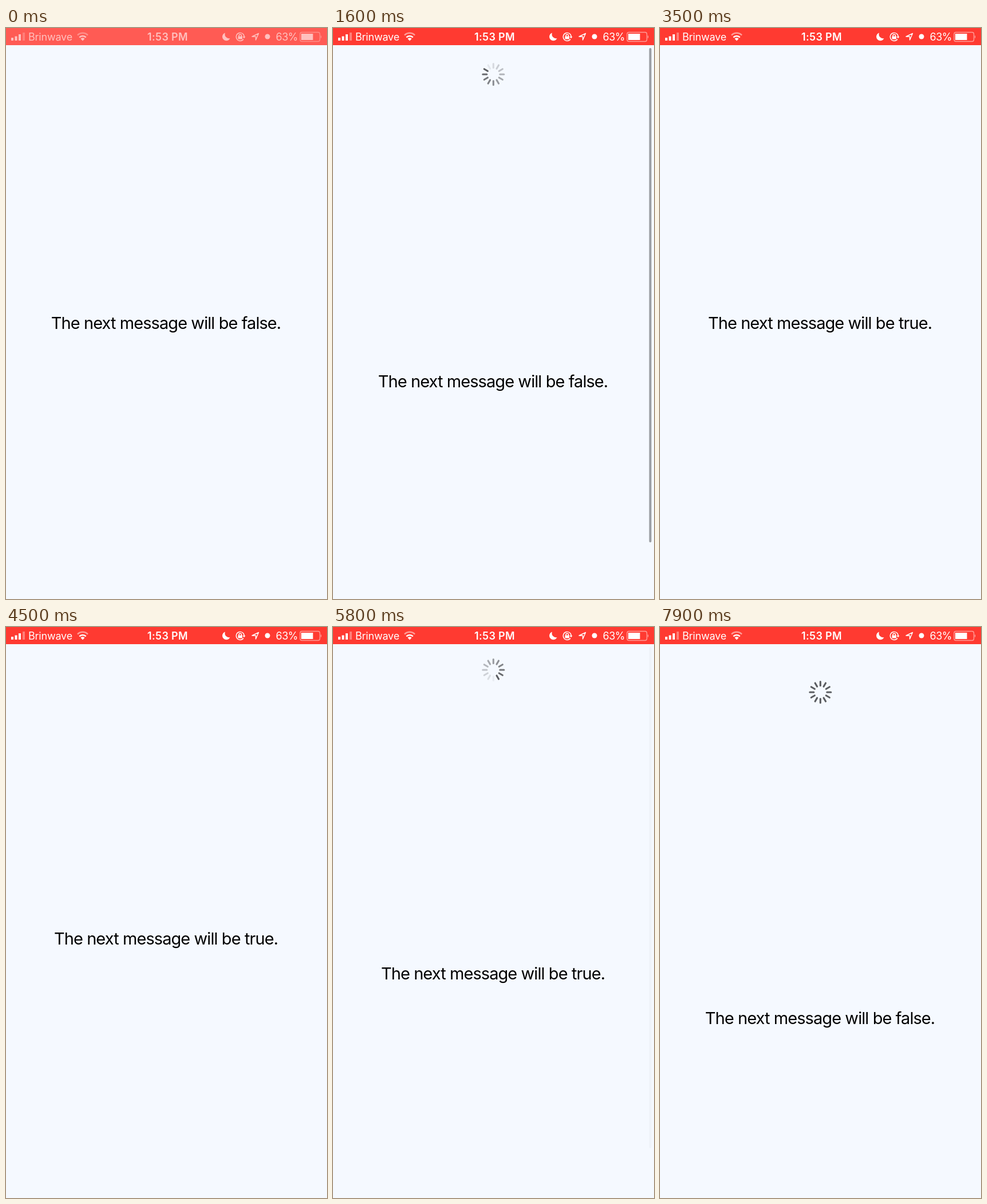
Write an HTML page that moves like this. It is 561 by 998 pixels and loops after 8000 ms.

```html
<!DOCTYPE html>
<html lang="en">
<head>
<meta charset="utf-8">
<title>Pull to refresh</title>
<style>
  html, body { margin: 0; width: 100%; height: 100%; overflow: hidden; background: #f5f9ff; }
  svg { display: block; font-family: Inter, Roboto, sans-serif; }
  #message { font-size: 29px; letter-spacing: -.93px; text-anchor: middle; }
  #status { fill: #fff; font-size: 18px; }
  .stroke { fill: none; stroke: #fff; stroke-width: 1.4; }
  #spinner line { stroke: #5b5d61; stroke-width: 3.1; stroke-linecap: round; }
</style>
</head>
<body>
<svg width="561" height="998" viewBox="0 0 561 998">
  <text id="message" x="279.500" y="526"></text>
  <g id="spinner"></g>
  <rect id="scrollbar" x="552.5" y="35" width="4" rx="2" fill="#9a9da2"/>
  <rect id="bar" width="561" height="30"/>
  <g id="status">
    <path d="M9 17h4v5h-4zM15.500 14.500h4v7.500h-4zM22 11h4v11h-4z"/>
    <path d="M29 8h4v14h-4z" opacity=".35"/>
    <text x="39" y="22" letter-spacing="-.2">Brinwave</text>
    <path d="M134 22.500l-3.500-3.700a5 5 0 0 1 7 0z"/>
    <path class="stroke" style="stroke-width: 2.5" d="M128.300 16.300a8 8 0 0 1 11.400 0"/>
    <path class="stroke" style="stroke-width: 2.5" opacity=".5" d="M125 12.700a12.500 12.500 0 0 1 18 0"/>
    <text x="282.500" y="22" font-weight="600" letter-spacing=".35" text-anchor="middle">1:53 PM</text>
    <path d="M383 8.500a7 7 0 1 0 8.500 9.500a7.200 7.200 0 0 1 -8.500 -9.500z"/>
    <path class="stroke" d="M415 19.500a7 7 0 1 1 1.300 -4M407 15v-1.500a2.300 2.300 0 0 1 4.600 0v1.500"/>
    <path d="M405.500 14.500h7.500v5h-7.500zM413.500 15h5l-2.500 3.300z"/>
    <path class="stroke" stroke-linejoin="round" d="M441.500 9.500l-5 11.500v-6h-6.500z"/>
    <circle cx="457" cy="15" r="4.500"/>
    <text x="471.500" y="22" letter-spacing="-.5">63%</text>
    <rect class="stroke" x="514" y="7.500" width="34.500" height="16" rx="3" opacity=".5"/>
    <path d="M516 10h20.500v11h-20.500z"/>
    <path d="M550 12.500q2.500 3 0 6z" opacity=".6"/>
  </g>
</svg>
<script>
const LOOP = 8000, STEP = 100, REST = 90, CLOSE = 300;

// pull: finger starts; begin: refresh fires; done: new message arrives
const drags = [
  { pull: 680, rise: 471, peak: 246.5, begin: 1020, release: 1300, done: 3140 },
  { pull: 4440, rise: 270, peak: 233, begin: 4635, release: 5000, done: 6750 },
  { pull: 7680, rise: 340, peak: 235, begin: LOOP, release: LOOP, done: LOOP }
];

const $ = id => document.getElementById(id);
const clamp = (x, lo = 0, hi = 1) => Math.min(hi, Math.max(lo, x));
const mix = (a, b, u) => a + (b - a) * u;

const spokes = Array.from({ length: 12 }, (_, i) => {
  const line = document.createElementNS('http://www.w3.org/2000/svg', 'line');
  line.setAttribute('y1', -11.5);
  line.setAttribute('y2', -18.5);
  line.setAttribute('transform', `rotate(${i * 30})`);
  $('spinner').append(line);
  return line;
});

function offsetAt(d, t) {
  if (t < d.release) {
    const u = clamp((t - d.pull) / d.rise);
    return d.peak * u * u * (3 - 2 * u);
  }
  if (t < d.done) return REST + (d.peak - REST) * Math.exp(-.0086 * (t - d.release));
  return REST * (1 + Math.cos(Math.PI * clamp((t - d.done) / CLOSE))) / 2;
}

function drawSpinner(d, t, offset) {
  const spin = t - d.begin;
  const left = 1 - clamp((t - d.done) / CLOSE);
  const turn = 360 * clamp(spin / 515);
  const head = Math.floor(3.1 + spin * 12 / 1000);
  const shown = Math.floor((offset - 34) / 11);
  const contrast = clamp(spin / 600);
  spokes.forEach((spoke, i) => {
    const age = (head - i + 1200) % 12;
    spoke.style.opacity = spin < 0 ? +(i < shown) : 1 - contrast * age / 12;
  });
  $('spinner').style.opacity = left;
  $('spinner').setAttribute('transform',
    `translate(280.3 ${30 + offset / 2}) scale(${left}) rotate(${turn})`);
}

function draw(t) {
  const d = drags.findLast(d => t >= d.pull) || drags[0];
  const offset = Math.round(offsetAt(d, t));
  const isTrue = t >= drags[0].done && t < drags[1].done;
  $('message').textContent = `The next message will be ${isTrue}.`;
  $('message').setAttribute('transform', `translate(0 ${offset})`);
  drawSpinner(d, t, offset);

  $('scrollbar').setAttribute('height', 966 - offset);
  $('scrollbar').style.opacity = t < d.begin ? 0 : clamp((d.release + 820 - t) / 300);

  const lit = clamp(t / 300);
  $('bar').setAttribute('fill', `rgb(255 ${mix(91, 58, lit)} ${mix(84, 49, lit)})`);
  $('status').style.opacity = mix(.62, 1, lit);
}

function tick(now) {
  draw(Math.floor(now % LOOP / STEP) * STEP);
  requestAnimationFrame(tick);
}
tick(performance.now());
</script>
</body>
</html>
```
